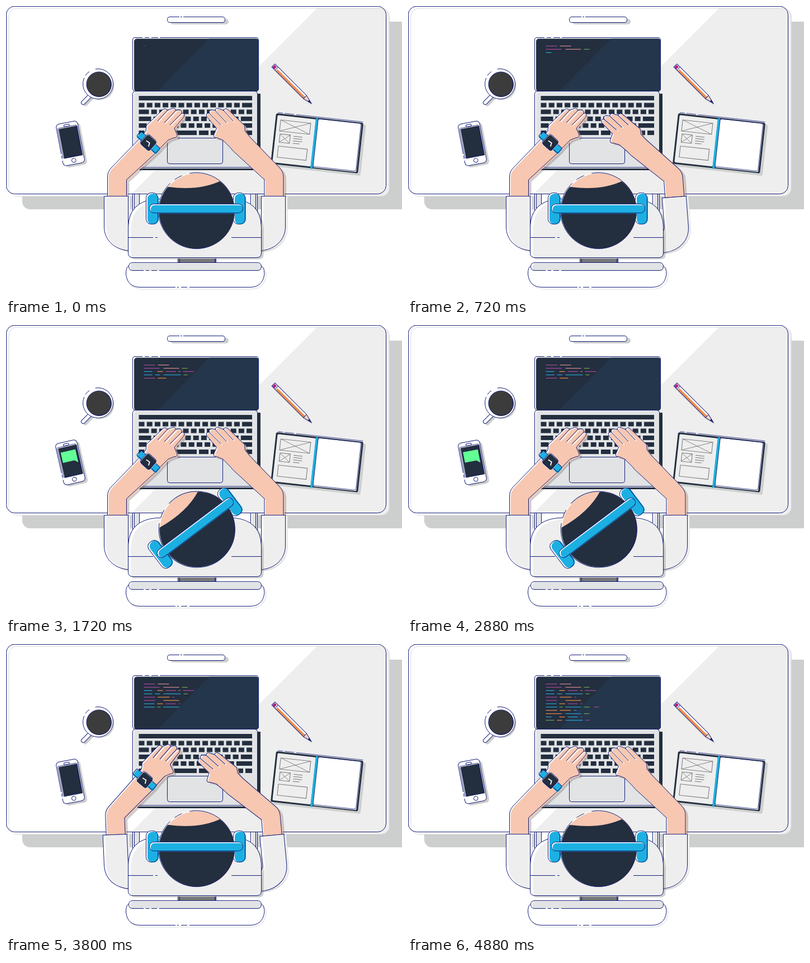
These frames come from a looping animation (708 by 521 pixels, 4.96 s). An HTML page with a canvas:

```html
<!DOCTYPE html>
<html lang="en">
<head>
<meta charset="utf-8">
<title>Desk from above</title>
<style>
html, body { margin: 0; width: 100%; height: 100%; overflow: hidden; background: #fff; }
canvas { display: block; width: 708px; height: 521px; }
</style>
</head>
<body>
<canvas id="stage" width="708" height="521"></canvas>
<script>
const ctx = document.getElementById('stage').getContext('2d');
const LOOP = 4960, STEP = 40, RESUME = 3160;
const NAVY = '#141d78', DARK = '#232e3f', PALE = '#eeeeee', GREY = '#e1e3e5',
  SHADE = '#cdcfce', SKIN = '#f7c7b1', BLUE = '#1cb0e2', WHITE = '#fff';
const SOFT = 'rgba(90,90,90,.29)';

// ---------- helpers ----------
const path = d => new Path2D(d);
function box(x, y, w, h, r = 0) {
  const p = new Path2D();
  p.roundRect(x, y, w, h, r);
  return p;
}
function disc(x, y, r) {
  const p = new Path2D();
  p.arc(x, y, r, 0, Math.PI * 2);
  return p;
}
function fill(p, color) {
  ctx.fillStyle = color;
  ctx.fill(p);
}
function line(p, color = NAVY, width = 1, dash = []) {
  ctx.strokeStyle = color;
  ctx.lineWidth = width;
  ctx.setLineDash(dash);
  ctx.stroke(p);
  ctx.setLineDash([]);
}
function group(draw) {
  ctx.save();
  draw();
  ctx.restore();
}
function shifted(dx, dy, draw) {
  group(() => { ctx.translate(dx, dy); draw(); });
}
function turned(x, y, deg, draw) {
  group(() => {
    ctx.translate(x, y);
    ctx.rotate(deg * Math.PI / 180);
    draw();
  });
}
// turn about a pivot, keeping stage coordinates
function swing(x, y, deg, draw) {
  turned(x, y, deg, () => { ctx.translate(-x, -y); draw(); });
}
const clamp = v => Math.min(1, Math.max(0, v));
const ramp = (t, a, b) => clamp((t - a) / (b - a));
const ease = (t, a, b) => { const u = ramp(t, a, b); return u * u * (3 - 2 * u); };
function along(keys, t) {
  let i = 0;
  while (i < keys.length - 2 && t > keys[i + 1][0]) i++;
  const [a, va] = keys[i], [b, vb] = keys[i + 1];
  return va + (vb - va) * ramp(t, a, b);
}

// ---------- desk ----------
function desk() {
  fill(box(29, 28, 690, 336, 14), SHADE);
  if (true) fill(box(686, 0, 22, 28), WHITE);
  const top = box(5, 4, 680.5, 337, 15);
  fill(box(0.5, 0.5, 679, 336.5, 15), WHITE);
  fill(top, WHITE);
  group(() => {
    ctx.clip(top);
    fill(path('M557 3H700V345H216Z'), PALE);
  });
  line(top, '#b9bac4', 0.5);
  line(box(0.5, 0.5, 679, 336, 15));
  fill(box(294, 23, 104, 10, 5), SHADE);
  fill(box(288.5, 19.5, 103, 10, 5), WHITE);
  line(path('M310 19.5H293Q288.5 19.5 288.5 24.5T293 29.5H387Q391.5 29.5 391.5 24.5T387 19.5H317M312 19.5H315'));
}

function cup() {
  const handle = path('M152 159L138 173');
  ctx.lineCap = 'round';
  shifted(4, 3, () => line(handle, SHADE, 7));
  line(handle, NAVY, 8);
  line(handle, WHITE, 6);
  ctx.lineCap = 'butt';
  fill(disc(168.5, 143, 25), SHADE);
  fill(disc(164.5, 139.5, 27), WHITE);
  const rim = new Path2D();
  rim.arc(164.5, 139.5, 27, -1.75, 3.55);
  rim.moveTo(142, 124.6);
  rim.arc(164.5, 139.5, 27, 3.73, 4.1);
  line(rim);
  fill(disc(166.5, 140.5, 22.5), '#3c3c3c');
  line(disc(166, 140, 22));
}

function pencil() {
  turned(478, 106.5, 45, () => {
    const body = path('M0 -4H80L96 0L80 4H0Z');
    shifted(3.5, 1, () => fill(body, SHADE));
    fill(body, WHITE);
    fill(box(10, -0.5, 70, 4), '#f28a4a');
    fill(path('M80 -3L95 0L80 4Z'), '#f9d3bd');
    fill(path('M89 -2L97 0L89 2Z'), NAVY);
    fill(box(1, -2.5, 5, 6), '#b5197c');
    line(body);
    line(path('M8 -4V4M80 -4V4'));
  });
}

function notebook() {
  turned(483, 192, 6.3, () => {
    fill(box(5, 3, 157, 92, 3), SHADE);
    fill(box(0, 0, 157, 91, 3), DARK);
    fill(box(3, 3, 69, 85, 2), PALE);
    fill(box(76, 2, 78, 87, 3), WHITE);
    line(box(76, 1.5, 77, 86, 3), NAVY, 0.8);
    line(path('M3 -1.5H12M15 -1.5H32M36 -1.5H156'), NAVY, 0.8);
    fill(box(71.5, 1, 4, 91), BLUE);
    const g = '#737478';
    line(box(9.5, 11, 54, 20), g);
    line(path('M9.5 11L63.5 31M63.5 11L9.5 31'), g, 0.8);
    line(box(11, 36, 18.5, 15), g);
    line(path('M11 36L29.5 51M29.5 36L11 51'), g, 0.8);
    for (let i = 0; i < 4; i++)
      line(path(`M35.5 ${37.5 + i * 4.2}h${i == 3 ? 12 : 16}`), g);
    line(box(10.5, 58, 52, 20), g);
  });
}

// ---------- phone ----------
function phoneTilt(t) {
  if (t < 1320 || t >= 2880) return 0;
  return -7 * Math.sin(ramp(t, 1320, 1680) * (Math.PI * 4 + 0.29));
}
function phone(t) {
  const note = t < RESUME ? ramp(t, 1340, 1480) : 1 - ramp(t, 3140, 3680);
  turned(115, 246, -10.8 + phoneTilt(t), () => {
    fill(box(-15, -34, 38.5, 76, 6), SHADE);
    fill(box(-19.5, -38, 39, 76, 6), WHITE);
    line(box(-19.5, -38, 39, 76, 6), NAVY, 1, [150, 3, 6, 3, 80, 0]);
    fill(box(-16, -29, 34, 54, 1), DARK);
    line(box(-17.5, -30.5, 34, 54, 1), NAVY, 0.8);
    line(box(-5.5, -34.5, 10, 3.5, 1.7));
    line(disc(0.5, 31, 3.7));
    group(() => {
      ctx.globalAlpha = note;
      fill(path('M-13 -21H14V-2V3L8 -2H-13Z'), '#62ff96');
    });
  });
}

// ---------- laptop ----------
const KEY_ROWS = [
  [173.5, 10, 18], [185.5, 18, 10], [198, 22, 18], [210, 14, 24]
];
function keyRow(y, first, last) {
  fill(box(237.5, y, first, 8), DARK);
  let x = 237.5 + first + 4.2;
  for (; x + 14.2 < 440.5 - last + 2; x += 14.2) fill(box(x, y, 10, 8), DARK);
  fill(box(x, y, 440 - x, 8), DARK);
}

const M = '#a8479b', O = '#ee8a48', C = '#2aa5d2', G = '#6fa843', P = '#d58b8c';
const CODE = [
  [[0, 20, M], [25, 20, P]],
  [[0, 28, M], [35, 28, P], [68, 10, G]],
  [[0, 15, C], [24, 10, O], [39, 18, M], [62, 3, O], [70, 20, M]],
  [[0, 15, C], [20, 9, C], [35, 31, C], [71, 7, G]],
  [[0, 20, M], [25, 21, O], [51, 3, M]],
  [[0, 20, M], [35, 28, O]],
  [[0, 19, C], [24, 10, O], [39, 18, M], [62, 3, M]],
  [[0, 20, C], [24, 6, G], [35, 28, C], [68, 10, G], [86, 9, M]],
  [[0, 20, O], [25, 20, O], [50, 5, C]],
  [[0, 28, O], [35, 28, C], [68, 10, G]],
  [[0, 10, C], [24, 10, O], [39, 18, C], [62, 3, M]],
  [[0, 15, G], [20, 9, O], [35, 31, C], [71, 7, M]]
];
// typed rows against time
const TYPING = [[0, 0.03], [340, 1], [680, 2], [720, 2.11], [1120, 3], [1280, 3.7],
  [1400, 4], [1680, 4.74], [3120, 4.74], [3400, 5.59], [4280, 10.15], [4800, 12]];

function code(t) {
  const done = along(TYPING, t);
  CODE.forEach((row, i) => {
    const [x, w] = row[row.length - 1];
    const reach = clamp(done - i) * (x + w);
    for (const [a, len, color] of row)
      if (reach > a) fill(box(246.5, 0, 0, 0), color),
        ctx.fillRect(246.5 + a, 71 + i * 5.9, Math.min(len, reach - a), 1.2);
  });
}

function laptop(t) {
  fill(box(233, 157, 222, 137, 5), DARK);
  fill(box(226.5, 152.5, 223, 137, 5), WHITE);
  fill(box(229, 153, 223, 138, 5), GREY);
  fill(box(450, 157, 5, 134), DARK);
  line(box(226.5, 152.5, 223, 136.5, 5));
  fill(box(226.5, 56, 223, 97, 5), WHITE);
  const screen = box(229, 58.5, 223, 94.5, 5);
  fill(screen, DARK);
  group(() => {
    ctx.clip(screen);
    fill(path('M364 58H460V154H269Z'), '#24364b');
  });
  line(path('M226.5 149V61Q226.5 56.5 231 56.5H244M248 56.5H256M260 56.5H272M275 56.5H447Q451.5 56.5 451.5 62V149'));
  line(path('M227 149Q227 152.5 231 152.5H449'));
  code(t);
  fill(box(237.5, 161, 202.5, 8), DARK);
  KEY_ROWS.forEach(r => keyRow(...r));
  for (const [x, w] of [[237.5, 10], [251.7, 10], [266, 10], [280, 17], [300.5, 40.5],
    [345, 17], [366, 10], [380, 10], [394, 14], [412, 12], [428, 12]])
    fill(box(x, 223, w, 8), DARK);
  line(box(288.5, 236.5, 99, 46, 4));
}

// ---------- chair ----------
function chair() {
  fill(box(308, 452.5, 68, 9), '#77787b');
  line(path('M307.5 452V461M310.5 452V461M373.5 452V461M375.5 452V461'));
  const seat = path('M220 465Q214 468 214.5 480Q217 503.5 240 503.5H436Q459 503.5 462 480Q462 468 456 465Z');
  shifted(3, 3, () => line(seat, '#b9bac4', 0.6));
  fill(seat, WHITE);
  line(path('M220 465Q214 468 214.5 480Q217 503.5 240 503.5H303M306 503.5H309M313 503.5H324M328 503.5H436Q459 503.5 462 480Q462 468 456 465'));
  fill(box(219.5, 459.5, 237, 14, 6.5), WHITE);
  fill(box(222, 461, 235, 13, 6), GREY);
  line(path('M246 473.5H226Q219.5 473 219.5 466.5T226 459.5H450Q456.5 460 456.5 466.5T450 473.5H274M250 473.5H256M260 473.5H270'));
}
function chairBack() {
  fill(box(226, 337, 224, 70), WHITE);
  fill(box(229, 337, 9, 60), GREY);
  fill(box(440, 337, 9, 60), GREY);
  line(path('M218 336.5H456M226.5 337V400M229.5 337V400M238.5 337V400M437.5 337V400M446.5 337V400M449.5 337V400'));
}

// ---------- person ----------
const SLEEVE = path('M175.5 340.5H218.5V395L240 438H219C194 436 175.5 419 175.5 395Z');
const ARM = path('M181.5 340.5V306Q181.5 297 188 290L242 234L250 224L251 214L280 186' +
  'Q285 181.5 288.5 187L296 184Q302 181 303.5 187L309 186Q315.5 186 314 192' +
  'Q320.5 191 318.5 198L301 219L306 231Q307 236 300 236L290 240L277 253L271 260L215.5 311V340.5Z');
const FINGERS = path('M288.5 187L271 206M303.5 187L283 209M314 192L293 213');

const leftLift = t => ease(t, 0, 400) - ease(t, 440, 720) + ease(t, 840, 1240) - ease(t, 1270, 1650);
const rightLift = t => ease(t, 280, 620) - ease(t, 620, 980) + ease(t, 1040, 1320) - ease(t, 1320, 1720);

function limb(dx, dy, mirror, draw) {
  shifted(dx, dy, () => {
    if (mirror) { ctx.translate(mirror, 0); ctx.scale(-1, 1); }
    draw();
  });
}
function arm(armFlip, sleeveFlip) {
  limb(5, 4, armFlip, () => fill(ARM, SOFT));
  limb(0, 0, armFlip, () => fill(ARM, WHITE));
  limb(2, 1.5, armFlip, () => {
    fill(ARM, SKIN);
    line(FINGERS, WHITE, 1.6);
  });
  limb(0, 0, armFlip, () => { line(ARM); line(FINGERS); });
  limb(4, 2.5, sleeveFlip, () => fill(SLEEVE, SOFT));
  limb(0, 0, sleeveFlip, () => fill(SLEEVE, WHITE));
  group(() => {
    limb(4, 1, sleeveFlip, () => fill(SLEEVE, PALE));
  });
  limb(0, 0, sleeveFlip, () => line(SLEEVE));
}
function watch() {
  turned(254.5, 244.5, 42, () => {
    fill(box(-22, -6, 46, 13, 2), BLUE);
    line(box(-23.5, -6.5, 46, 12, 2));
    fill(box(-12, -12, 24, 24, 5), WHITE);
    fill(box(-10.5, -10.5, 22, 22, 4), DARK);
    line(box(-11.5, -11.5, 22, 22, 4));
    line(path('M-5 0L2 -1L5 5'), WHITE, 1.8);
  });
}

function torso() {
  const body = path('M218.5 395Q220 350 268 345.5H408Q455 350 456.5 395V442Q456.5 450.5 448 450.5H227Q218.5 450.5 218.5 442Z');
  shifted(4, 3, () => fill(body, SOFT));
  fill(body, WHITE);
  group(() => {
    ctx.clip(body);
    shifted(5, 3, () => fill(body, PALE));
  });
  line(body);
  line(path('M219 414.5H263M267 414.5H271M403 414.5H456'));
}

function earCup(x) {
  fill(box(x, 334.5, 21, 56, 9), WHITE);
  fill(box(x + 2.5, 336, 20, 55, 9), BLUE);
  line(box(x, 334.5, 21, 56, 9));
}
function head(t) {
  const turn = t < RESUME - STEP ? ease(t, 1280, 1680) : 1 - ease(t, 3120, 3440);
  swing(340, 365, -37 * turn, () => {
    earCup(250.5);
    earCup(406.5);
    fill(disc(340.5, 366.5, 68), WHITE);
    fill(disc(342, 367, 67.5), SKIN);
    group(() => {
      ctx.clip(path('M260 318L291 324Q346 331 384 313L420 300V445H260Z'));
      fill(disc(341, 367, 67.5), DARK);
    });
    const rim = new Path2D();
    rim.arc(340.5, 366.5, 68, -1.75, 3.95);
    rim.moveTo(301.5, 310.8);
    rim.arc(340.5, 366.5, 68, 4.1, 4.32);
    line(rim);
    fill(box(256.5, 354.5, 167, 16, 8), WHITE);
    fill(box(258.5, 356.5, 165.5, 15, 7.5), BLUE);
    line(box(256.5, 354.5, 167, 16, 8));
  });
}

// ---------- scene ----------
function draw(t) {
  const beat = t < RESUME ? t : t - RESUME;
  ctx.clearRect(0, 0, 708, 521);
  desk();
  cup();
  phone(t);
  pencil();
  notebook();
  laptop(t);
  chairBack();
  chair();
  swing(218, 395, -12.3 * leftLift(beat), () => { arm(0, 0); watch(); });
  swing(499, 370, -5.3 * rightLift(beat), () => arm(677.5, 675));
  torso();
  head(t);
}
function tick() {
  const t = performance.now() % LOOP;
  draw(Math.floor(t / STEP) * STEP);
  requestAnimationFrame(tick);
}
tick();
</script>
</body>
</html>
```
